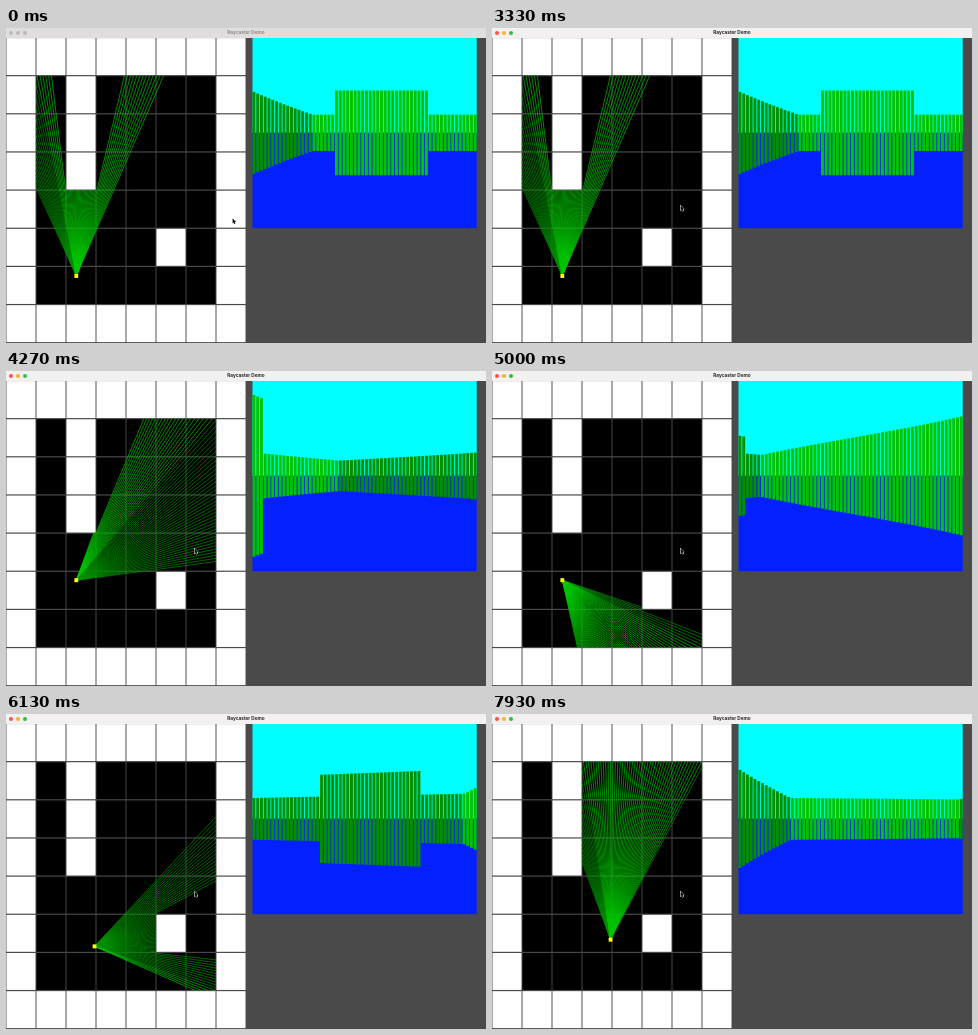
Recreate the animation shown at these times as an HTML page with a canvas. Size 480 by 315 pixels, loop 8000 ms.

```html
<!DOCTYPE html>
<html lang="en">
<head>
<meta charset="utf-8">
<title>Raycaster Demo</title>
<style>
  html, body { margin: 0; width: 100%; height: 100%; overflow: hidden; background: #4a4a4b; }
  canvas { position: absolute; left: 0; top: 0; }
  #bar {
    position: absolute; left: 0; top: 0; width: 480px; height: 9.5px;
    background: #dfdddd; color: #8d8b8b; text-align: center;
    font: 700 4.7px/9.4px Inter, "Liberation Sans", sans-serif;
  }
  #bar i { position: absolute; top: 2.6px; width: 4px; height: 4px; border-radius: 50%; background: #bcbaba; }
  #bar.active { background: #f3f0f2; color: #262426; }
  #bar.active i { background: var(--c); }
</style>
</head>
<body>
<canvas id="stage" width="480" height="315"></canvas>
<div id="bar">
  <i style="left:3px;--c:#fb5348"></i><i style="left:10px;--c:#f5b522"></i><i style="left:17px;--c:#2fbf3a"></i>
  Raycaster Demo
</div>
<script>
const LOOP = 8000;
const CELL = 64, SX = 30 / CELL, SY = 38.15 / CELL, TOP = 9.5;
const VIEW_X = 246.5, VIEW_W = 224.2, VIEW_H = 320, RAYS = 60, STEP = 8 * SX;
const MAP = ["11111111", "10100001", "10100001", "10100001",
             "10000001", "10000101", "10000001", "11111111"];
const BACK = "#4a4a4b", BRIGHT = "#00c400", DARK = "#009000";
const MARKER_LAG = 40;

// Key presses: start, end, number of presses, forward units, degrees
const MOVES = [
  [3400, 3860, 13, 5, 0],
  [3870, 4500, 18, 0, -5],
  [4640, 4970, 9, 0, -5],
  [5280, 5700, 11, 5, 0],
  [5740, 6125, 11, 0, 5],
  [6400, 7200, 13, 5, 0],
  [7250, 7920, 15, 0, 5]
];

const ctx = document.getElementById("stage").getContext("2d");
const bar = document.getElementById("bar");
const rad = deg => deg * Math.PI / 180;
const clamp = v => Math.min(1, Math.max(0, v));
const mapX = x => x * SX;
const mapY = y => TOP + y * SY;

function box(x, y, w, h, color) {
  ctx.fillStyle = color;
  ctx.fillRect(x, y, w, h);
}

function poseAt(t) {
  const p = { x: 150, y: 400, a: 90 };
  for (const [from, to, count, forward, turn] of MOVES) {
    const n = Math.floor(count * clamp((t - from) / (to - from)) + 1e-6);
    p.x += Math.cos(rad(p.a)) * forward * n;
    p.y -= Math.sin(rad(p.a)) * forward * n;
    p.a += turn * n;
  }
  return p;
}

// Walks the grid cell by cell until a wall is met.
function cast(x, y, deg) {
  const dx = Math.cos(rad(deg)), dy = -Math.sin(rad(deg));
  const sx = Math.sign(dx), sy = Math.sign(dy);
  let cx = Math.floor(x / CELL), cy = Math.floor(y / CELL);
  let tx = dx ? ((cx + (sx > 0)) * CELL - x) / dx : Infinity;
  let ty = dy ? ((cy + (sy > 0)) * CELL - y) / dy : Infinity;
  for (;;) {
    const vertical = tx < ty;
    const dist = vertical ? tx : ty;
    if (vertical) { cx += sx; tx += CELL / Math.abs(dx); }
    else { cy += sy; ty += CELL / Math.abs(dy); }
    if (MAP[cy][cx] === "1") return { dist, vertical, x: x + dx * dist, y: y + dy * dist };
  }
}

function drawMap() {
  MAP.forEach((row, r) => [...row].forEach((c, i) =>
    box(mapX(i * CELL + 1), mapY(r * CELL + 1), 62 * SX, 62 * SY, c === "1" ? "#fefefe" : "#000")));
}

function drawMarker(p) {
  box(mapX(p.x) - 1.9, mapY(p.y) - 2, 3.8, 4, "#ffff00");
}

function drawRays(p) {
  const mid = mapY(VIEW_H / 2), half = VIEW_H / 2 * SY;
  box(VIEW_X, TOP, VIEW_W, half, "#00ffff");
  box(VIEW_X, mid, VIEW_W, half, "#0420ff");
  ctx.lineWidth = 0.7;
  for (let r = 0; r < RAYS; r++) {
    const offset = 30 - r;
    const hit = cast(p.x, p.y, p.a + offset);
    const color = hit.vertical ? DARK : BRIGHT;
    ctx.strokeStyle = color;
    ctx.beginPath();
    ctx.moveTo(mapX(p.x), mapY(p.y));
    ctx.lineTo(mapX(hit.x), mapY(hit.y));
    ctx.stroke();
    const h = Math.min(VIEW_H, CELL * VIEW_H / (hit.dist * Math.cos(rad(offset)))) * SY;
    box(VIEW_X + r * STEP, mid - h / 2, 2.9, h, color);
  }
}

function drawCursor(t) {
  const k = clamp((t - 2530) / 400), e = k * k * (3 - 2 * k);
  ctx.save();
  ctx.translate(226.6 - 38 * e, 190.4 - 13 * e);
  ctx.beginPath();
  [[0, 0], [0, 5], [1.1, 4], [1.9, 5.8], [2.8, 5.4], [2, 3.7], [3.5, 3.6]]
    .forEach(([x, y]) => ctx.lineTo(x, y));
  ctx.closePath();
  ctx.lineWidth = 1;
  ctx.strokeStyle = "#fff";
  ctx.stroke();
  ctx.fillStyle = "#000";
  ctx.fill();
  ctx.restore();
}

function draw(t) {
  box(0, 0, 480, 315, BACK);
  drawMap();
  drawRays(poseAt(t));
  drawMarker(poseAt(t - MARKER_LAG));
  drawCursor(t);
  bar.classList.toggle("active", t >= 3070);
}

const start = performance.now();
function tick() {
  draw((performance.now() - start) % LOOP);
  requestAnimationFrame(tick);
}
tick();
</script>
</body>
</html>
```
